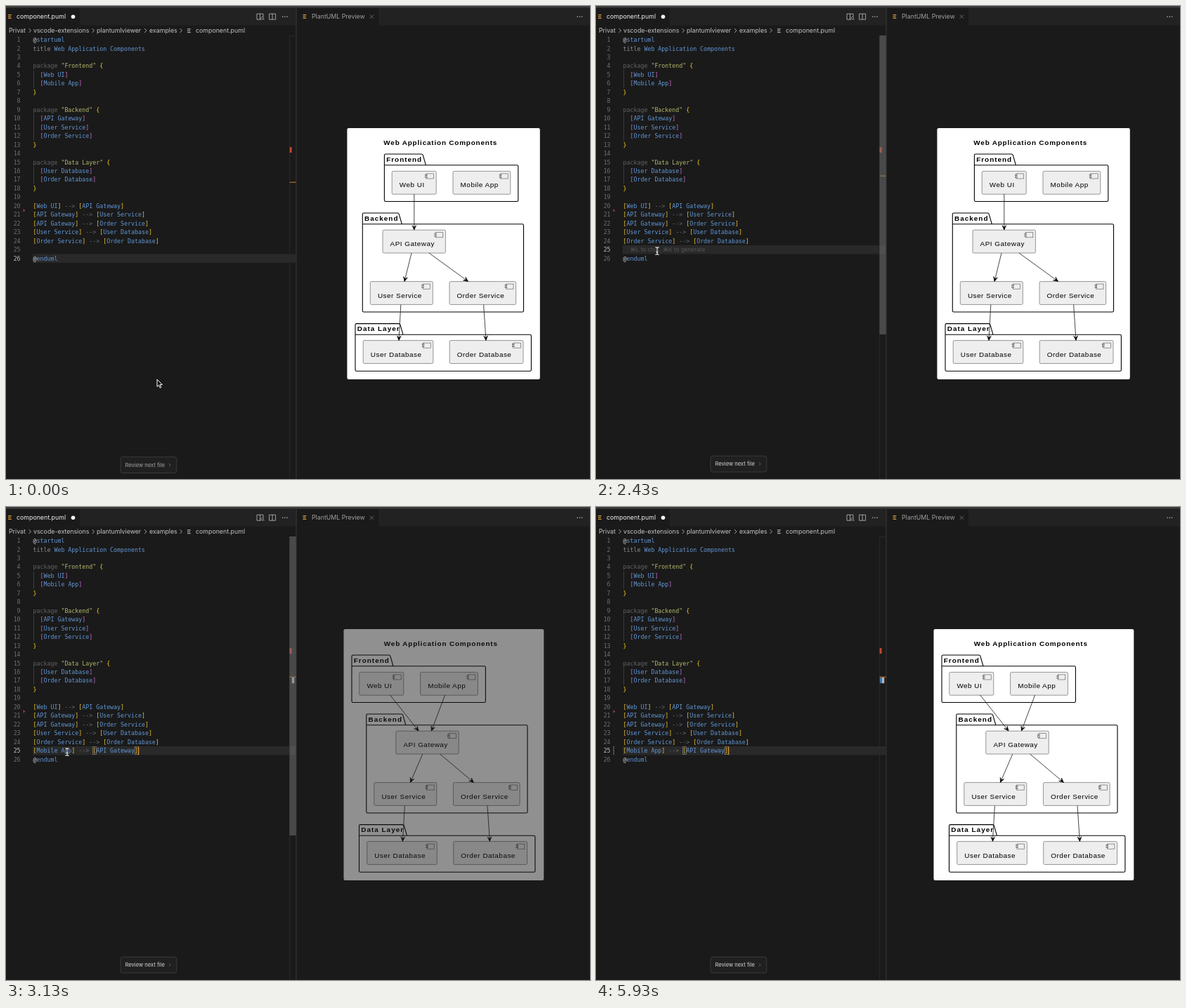
Animation of 831x674 px, one loop 5960 ms. Source, as an HTML page:

```html
<!DOCTYPE html>
<html>
<head>
<meta charset="utf-8">
<style>
html, body { margin: 0; width: 100%; height: 100%; overflow: hidden; background: #1a1a1a; }
svg { display: block; }
text { font: 8.8px Inter, "Open Sans", sans-serif; fill: #c4c4c4; }
.code { font: 8.28px "DejaVu Sans Mono", monospace; }
.num { text-anchor: end; fill: #6e6e6e; }
.uml text { font: 9.94px "Liberation Sans", Arial, sans-serif; fill: #000; letter-spacing: .5px; }
.uml .bold { font-weight: bold; letter-spacing: 1px; }
.uml .title { letter-spacing: .82px; }
.line { fill: none; stroke: #c0c0c0; stroke-width: .8; }
</style>
</head>
<body>
<svg id="stage" width="831" height="674" viewBox="0 0 831 674"></svg>
<script>
const LOOP = 5960, CLICK = 1500, TYPED = 2640, SWAP = 2940, MARKED = 3440;
const LEFT = 38.6, CHAR = 4.985, TOP = 41.9, ROW = 12.46;

const rect = (x, y, w, h, fill, extra = '') =>
  `<rect x="${x}" y="${y}" width="${w}" height="${h}" fill="${fill}" ${extra}/>`;
const text = (x, y, s, extra = '') => `<text x="${x}" y="${y}" ${extra}>${s}</text>`;
const path = (d, extra = 'class="line"') => `<path d="${d}" ${extra}/>`;
const group = (id, body, extra = '') => `<g id="${id}" ${extra}>${body}</g>`;
const chevron = (x, y, r) => path(`M${x} ${y - r}l${r} ${r}l${-r} ${r}`);
const bars = (x, y, color) => [0, 2.4, 4.8].map((d, i) => rect(x, y + d, i == 1 ? 4 : 4.8, 1.2, color)).join('');
const dots = (x, y) => [0, 3.2, 6.4].map(d => `<circle cx="${x + d}" cy="${y}" r=".8" fill="#c0c0c0"/>`).join('');

// ---- Window chrome
function chrome() {
  const crumbs = [[4, 'Privat'], [39, 'vscode-extensions'], [129, 'plantumlviewer'], [204, 'examples'], [270, 'component.puml']];
  return rect(0, 0, 831, 674, '#1a1a1a') + rect(0, 2.5, 831, 25, '#222') +
    rect(0, 2.5, 105, 25, '#1a1a1a') + rect(414, 2.5, 116, 25, '#1a1a1a') +
    rect(0, 0, 831, 2.5, '#3d3d3d') + rect(412.5, 2.5, 1, 672, '#363636') +
    bars(3, 12, '#d19a3c') + text(15, 18.2, 'component.puml', 'style="fill:#f0f0f0"') +
    '<circle cx="95.5" cy="15.2" r="2.8" fill="#f4f4f4"/>' +
    path('M363 19.2h-6v-8h9v4M361.5 11.2v8M364.8 15.4a1.7 1.7 0 1 0 .1 0M366 18.6l1.4 1.4M374.6 11.2h9v8h-9zM379.1 11.2v8') +
    dots(393.6, 15.3) + dots(813.2, 15.3) +
    bars(422.5, 12, '#d19a3c') + text(435, 18.2, 'PlantUML Preview', 'style="fill:#a0a0a0"') +
    path('M517.8 12.6l5.2 5.2m0-5.2l-5.2 5.2', 'fill="none" stroke="#777" stroke-width=".8"') +
    crumbs.map(([x, s]) => text(x, 38.1, s)).join('') +
    [32.5, 122.5, 197, 247.5].map(x => chevron(x, 35, 3)).join('') + bars(258, 32.2, '#a8a8a8');
}

// ---- Editor
const source = `@startuml
title Web Application Components

package "Frontend" {
  [Web UI]
  [Mobile App]
}

package "Backend" {
  [API Gateway]
  [User Service]
  [Order Service]
}

package "Data Layer" {
  [User Database]
  [Order Database]
}

[Web UI] --> [API Gateway]
[API Gateway] --> [User Service]
[API Gateway] --> [Order Service]
[User Service] --> [User Database]
[Order Service] --> [Order Database]

@enduml`.split('\n');

const token = /(@)|("[^"]+")|([{}])|([[\]])|(-->)|(title)|(package)|([^@"{}[\]-]+)/g;
const colors = ['#d8d8d8', '#b3b66c', '#ffd21c', '#f2c32c', '#6a6a6a', '#8e8e8e', '#626262', '#6296d4'];

function codeLine(s, i) {
  const body = s.trim(), indent = s.length - body.length;
  const spans = body.replace(token, (m, ...g) => {
    const kind = g.slice(0, 8).findIndex(Boolean);
    const color = kind == 3 && indent ? '#d267d0' : colors[kind];
    return `<tspan fill="${color}">${m.replace('>', '&gt;')}</tspan>`;
  });
  return text(LEFT + indent * CHAR, TOP + i * ROW + 9.2, spans, 'class="code"') +
    (indent ? rect(39, TOP + i * ROW, .8, ROW, '#454545') : '');
}

function editor() {
  const numbers = source.map((_, i) => text(20.6, TOP + i * ROW + 9.2, i + 1, `class="code num" id="n${i}"`));
  const boxes = [17, 29].map(c => rect(LEFT + c * CHAR, TOP + 24 * ROW + .8, CHAR, ROW - 1.6, 'none', 'stroke="#8c8c8c" stroke-width=".7"'));
  return rect(38, 0, 374.5, ROW, '#292929', 'id="active"') +
    numbers.join('') + source.map(codeLine).join('') +
    text(48.5, 350.4, '⌘L to chat, ⌘K to generate', 'id="hint" style="font-size:8.2px;fill:#555"') +
    group('typed', boxes.join('') + codeLine('[Mobile App] --> [API Gateway]', 24)) +
    rect(188, 341.6, 1.3, 11.6, '#d98b2b', 'id="caret"') +
    path('M24.6 289l2.8 2.4l-2.8 2.4z', 'fill="#a8384a"') +
    path('M25.2 341v12.6', 'id="change" stroke="#66727c" stroke-width="1.6" stroke-dasharray="1.8 .7"') +
    rect(403.3, 42, .8, 632, '#2d2d2d') + rect(403.3, 42, 9.2, .8, '#2d2d2d') +
    rect(403.6, 201, 3, 8, '#c24430') +
    rect(403.6, 0, 9, 1.2, '#b06f2c', 'id="ruler"') +
    rect(406.8, 243, 3.4, 8.2, '#b8b8b8', 'id="match"') + rect(403.8, 243, 3, 8.2, '#3f78b4', 'id="blue"') +
    rect(403.5, 42, 9.2, 426, '#797979', 'id="scroll"') +
    group('button', rect(163, 641.2, 79.8, 22.8, '#202020', 'rx="3.2" stroke="#3e3e3e" stroke-width=".9"') +
      text(169.5, 655.4, 'Review next file', 'style="font-size:7.6px;fill:inherit"') +
      path('M232 650.6l2 2l-2 2', 'fill="none" stroke="#777" stroke-width=".8"'));
}

// ---- Diagram
function component(x, y, w, name) {
  const pen = 'stroke="#555" stroke-width=".6"', ix = x + w - 14.2, iy = y + 3.5;
  return rect(x, y, w, 32.8, '#eee', `rx="1.8" ${pen}`) +
    rect(ix, iy, 10.6, 7.1, '#eee', pen) +
    [1.3, 4.2].map(d => rect(ix - 1.4, iy + d, 2.8, 1.4, '#eee', pen)).join('') +
    text(x + 10.6, y + 22.9, name);
}

function pack(x, y, w, h, tab, name) {
  return path(`M${x + 1.8} ${y}h${tab - 1.8}q1.5 0 2 1.8l4 13.9h${w - tab - 7.8}q1.8 0 1.8 1.8V${y + h - 1.8}q0 1.8 -1.8 1.8H${x + 1.8}q-1.8 0 -1.8 -1.8V${y + 1.8}q0 -1.8 1.8 -1.8zM${x} ${y + 15.7}h${tab + 6}`,
    'fill="none" stroke="#000" stroke-width="1.1"') + text(x + 2.8, y + 10.7, name, 'class="bold"');
}

function arrow([x1, y1, x2, y2]) {
  const angle = Math.atan2(y2 - y1, x2 - x1) * 180 / Math.PI;
  return path(`M${x1} ${y1}L${x2} ${y2}`, 'stroke="#181818" stroke-width=".8"') +
    path('M0 0L-6.4 -2.9L-3.6 0L-6.4 2.9z', `transform="translate(${x2} ${y2}) rotate(${angle})" fill="#000" stroke="#000" stroke-width=".6"`);
}

function diagram(id, cardX, cardW, front, api, rest, edges) {
  return group(id, rect(cardX, 174, cardW, 358, '#fff', 'rx="2.2"') +
    text(537.3 + rest / 10, 197.6, 'Web Application Components', 'class="bold title"') +
    pack(538.4 + front, 211, 190.4, 67.5, 53, 'Frontend') +
    component(549.2 + front, 235.4, 63, 'Web UI') + component(636 + front, 235.4, 81.8, 'Mobile App') +
    pack(507.3 + rest, 295, 229.2, 141, 50, 'Backend') +
    component(536 + api, 319.2, 89.4, 'API Gateway') +
    component(518.3 + rest, 392.6, 89, 'User Service') + component(631 + rest, 392.6, 94.6, 'Order Service') +
    pack(497 + rest, 452.6, 250.4, 67.6, 62, 'Data Layer') +
    component(508.2 + rest, 476.6, 99.6, 'User Database') + component(631.2 + rest, 476.6, 104.8, 'Order Database') +
    edges.map(arrow).join(''), 'class="uml"');
}

const before = diagram('before', 485.4, 274.4, 0, 0, 0, [
  [580.8, 268, 580.8, 319], [577, 352, 567, 392.4], [602, 352, 657.5, 392.4],
  [561.8, 425.6, 559, 476.4], [679.6, 425.6, 683, 476.4]]);
const after = diagram('after', 480.5, 284.8, -46.4, 18.8, 5.5, [
  [546.6, 268, 587, 319], [624.6, 268, 605.4, 319], [592.8, 352, 575.4, 392.4], [617.6, 352, 665.4, 392.4],
  [567.4, 425.6, 564.4, 476.4], [685, 425.6, 688.4, 476.4]]);

const pointer = group('pointer', path('M0 0v10.4l2.4 -2.2l1.7 3.9l1.7 -.8l-1.7 -3.7h3.3z', 'fill="#111" stroke="#fff" stroke-width="1"'));
const beamShape = 'M-2.6 -5.4q2.6 0 2.6 1.6q0 -1.6 2.6 -1.6M0 -4v8M-2.6 5.4q2.6 0 2.6 -1.6q0 1.6 2.6 1.6M-1.3 1.6h2.6';
const beam = group('beam', path(beamShape, 'fill="none" stroke="#111" stroke-width="2.4"') +
  path(beamShape, 'fill="none" stroke="#fff" stroke-width="1.1"'));

document.getElementById('stage').innerHTML = chrome() + editor() + before + after + pointer + beam;

// ---- Motion
const el = id => document.getElementById(id);
const set = (id, name, value) => el(id).setAttribute(name, value);
const show = (id, on) => set(id, 'visibility', on ? 'visible' : 'hidden');
const ramp = (t, a, b) => Math.min(1, Math.max(0, (t - a) / (b - a)));
const smooth = p => p * p * (3 - 2 * p);
const mix = (a, b, p) => a + (b - a) * p;

function mouse(t) {
  if (t < CLICK) {
    const p = smooth(ramp(t, 250, 1050));
    return [mix(215, 87, p), mix(532, 347.5, p)];
  }
  if (t < 4630) {
    const p = ramp(t, 4230, 4630) ** 1.6;
    return [mix(87, 497, p), mix(349, 90, p)];
  }
  const p = ramp(t, 4630, 4780);
  return [mix(497, 716, p), mix(90, 8, p)];
}

function draw(t) {
  const focused = t >= CLICK, typed = t >= TYPED, swapped = t >= SWAP, row = focused ? 24 : 25;
  set('active', 'y', TOP + row * ROW);
  for (const i of [24, 25]) el('n' + i).style.fill = i == row ? '#c0c0c0' : '';
  show('hint', focused && !typed);
  show('typed', typed);
  show('caret', typed && Math.floor((t - 2620) / 675) % 2 == 0);
  show('match', typed);
  show('change', t >= MARKED);
  show('blue', t >= MARKED);
  set('ruler', 'y', focused ? 241.6 : 250.6);
  set('scroll', 'opacity', .5 * ramp(t, CLICK, CLICK + 100) * (1 - ramp(t, 4500, 4610)));
  set('button', 'transform', `translate(0 ${focused ? 0 : 1.4})`);
  set('button', 'fill', focused ? '#d4d4d4' : '#a2a2a2');

  show('before', !swapped);
  show('after', swapped);
  set('before', 'opacity', mix(1, .3, ramp(t, 2720, 2900)));
  set('after', 'opacity', mix(.3, 1, smooth(ramp(t, 2960, 3420))));

  const [x, y] = mouse(t), overText = focused && x < 403;
  show('beam', overText);
  show('pointer', !overText && t < 4790);
  for (const id of ['beam', 'pointer']) set(id, 'transform', `translate(${x} ${y})`);
}

const start = performance.now();
function tick() {
  draw((performance.now() - start) % LOOP);
  requestAnimationFrame(tick);
}
tick();
</script>
</body>
</html>
```
